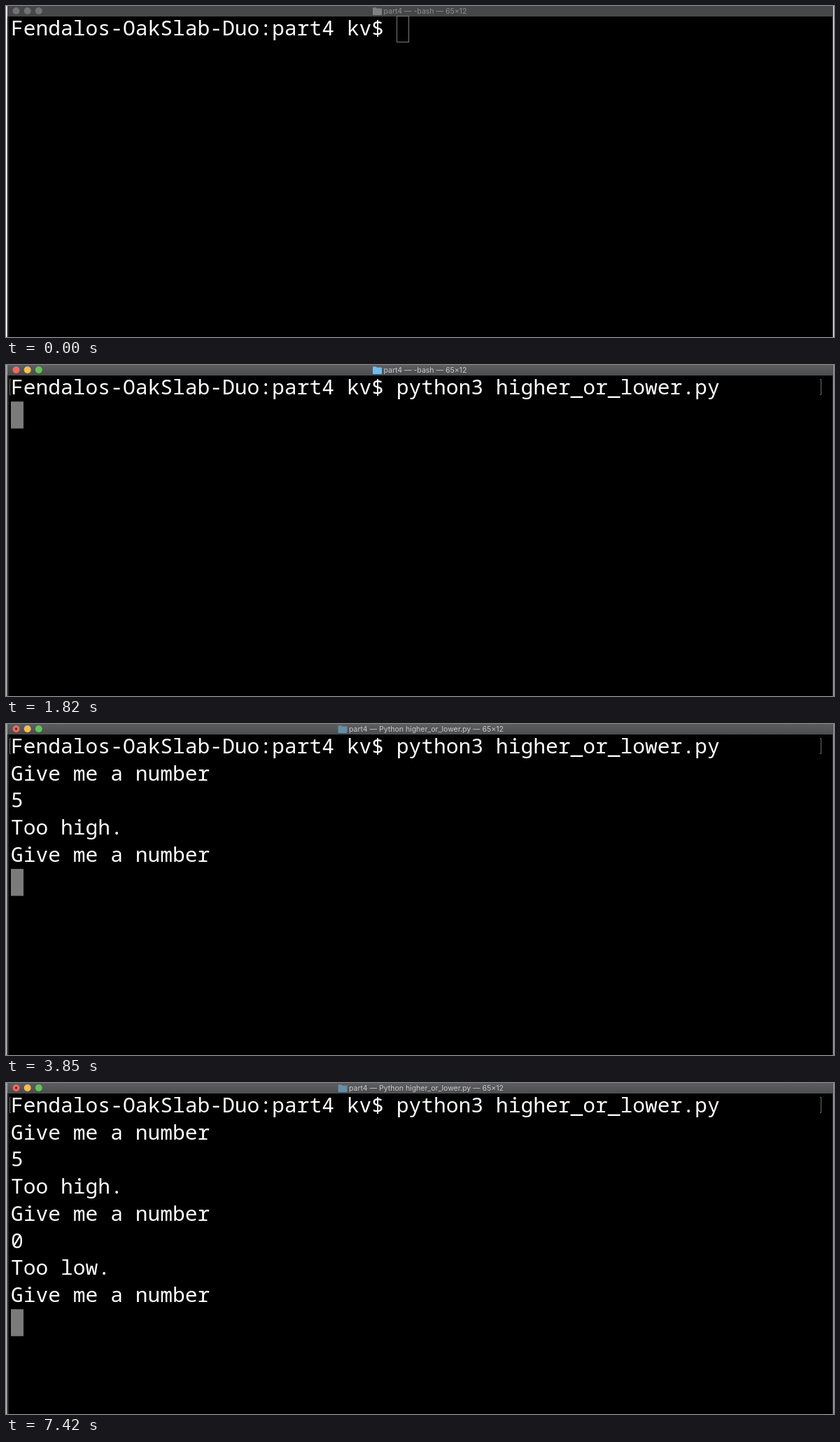
Recreate the animation shown at these times as an HTML page. Size 1183x473 px, loop 8000 ms.

```html
<!DOCTYPE html>
<html lang="en">
<head>
<meta charset="utf-8">
<title>Terminal</title>
<style>
  html, body { margin: 0; height: 100%; overflow: hidden; background: #000; }
  svg { display: block; }
  #lines { font: 29.62px "Noto Sans Mono", monospace; fill: #fff; }
  #title { font: 10.5px Inter, sans-serif; }
</style>
</head>
<body>
<svg width="1183" height="473" viewBox="0 0 1183 473">
  <defs>
    <linearGradient id="active" x2="0" y2="1">
      <stop stop-color="#5d5e60"/><stop offset="1" stop-color="#4b4c4e"/>
    </linearGradient>
    <path id="beam" d="M-3-6.5Q0-6.5 0-4.5Q0-6.5 3-6.5M0-4.5V4.5M-3 6.5Q0 6.5 0 4.5Q0 6.5 3 6.5M-1.5 2H1.5"/>
  </defs>
  <rect id="desktop" width="1183" height="473"/>
  <rect x="2" width="1179.5" height="473"/>
  <path d="M3.5 15V473" stroke="#3a3a3a"/>
  <rect id="bar" x="2" width="1179.5" height="15"/>
  <g id="lights">
    <circle cx="14.5" cy="7" r="5"/><circle cx="30.7" cy="7" r="5"/><circle cx="46.8" cy="7" r="5"/>
  </g>
  <circle id="busy" cx="14.5" cy="7" r="1.7" fill="#7a1c14"/>
  <path id="folder" d="M0 3.2q0-1 1-1h3.6l1.3 1.3h6.1q1 0 1 1v7.5q0 1-1 1h-11q-1 0-1-1z"/>
  <text id="title" y="11"></text>
  <rect id="cursor"/>
  <g id="lines"></g>
  <path id="marks" d="M7 20.5H5.5V42.5H7M1163 20.5H1164.5V42.5H1163" fill="none" stroke="#6e6e6e"/>
  <g id="pointer" fill="none" stroke-linecap="round" transform="translate(611.3 254.5)">
    <use href="#beam" stroke="#fff" stroke-width="3"/>
    <use href="#beam" stroke="#000"/>
  </g>
</svg>
<script>
const LOOP = 8000, LEFT = 7, CELL = 17.77, ROW = 38.72;
const ACTIVATE = 70, COMMAND = 1050, RUN = 1820, TITLE = 1890;

// Terminal output: [time, text appended]
const output = [
  [0, 'Fendalos-OakSlab-Duo:part4 kv$ '],
  [COMMAND, 'python3 higher_or_lower.py '],
  [RUN, '\n'],
  [1960, 'Give me a number\n'],
  [3220, '5'],
  [3850, '\nToo high.\nGive me a number\n'],
  [7070, '0'],
  [7280, '\nToo low.\nGive me a number\n'],
];

const $ = id => document.getElementById(id);
const set = (el, attrs) => Object.entries(attrs).forEach(([k, v]) => el.setAttribute(k, v));
const show = (id, on) => set($(id), { visibility: on ? 'visible' : 'hidden' });

const rows = Array.from({ length: 12 }, (_, i) => {
  const row = document.createElementNS('http://www.w3.org/2000/svg', 'text');
  set(row, { x: LEFT, y: 42 + ROW * i });
  return $('lines').appendChild(row);
});

function drawWindow(t) {
  const active = t >= ACTIVATE, running = t >= TITLE;
  const colors = active ? ['#ed6b60', '#f5be4f', '#61c555'] : Array(3).fill('#717273');
  // The active window casts a darker shadow on the desktop beside it
  set($('desktop'), { fill: active ? '#a0a0a0' : '#e4e4e4' });
  set($('bar'), { fill: active ? 'url(#active)' : '#464749' });
  [...$('lights').children].forEach((light, i) => set(light, { fill: colors[i] }));
  set($('folder'), {
    fill: !active ? '#808182' : running ? '#648fa8' : '#72bce8',
    transform: `translate(${running ? 474.5 : 524} 0)`,
  });
  set($('title'), { x: running ? 490 : 539.5, fill: active ? '#c9c9ca' : '#8b8c8d' });
  $('title').textContent = `part4 — ${running ? 'Python higher_or_lower.py' : '-bash'} — 65×12`;
  show('busy', running);
  show('marks', t >= RUN);
  show('pointer', active && t < COMMAND);
}

function drawText(t) {
  const lines = output.filter(([at]) => t >= at).map(([, text]) => text).join('').split('\n');
  rows.forEach((row, i) => row.textContent = lines[i] || '');
  const last = lines.length - 1, x = LEFT + lines[last].length * CELL, y = 13.5 + ROW * last;
  set($('cursor'), t >= ACTIVATE
    ? { x, y, width: 18, height: 38.5, fill: '#7b7b7b', stroke: 'none' }
    : { x: 558.5, y: 14.5, width: 17, height: 37, fill: 'none', stroke: '#7b7b7b' });
}

function frame() {
  const t = performance.now() % LOOP;
  drawWindow(t);
  drawText(t);
  requestAnimationFrame(frame);
}
frame();
</script>
</body>
</html>
```
